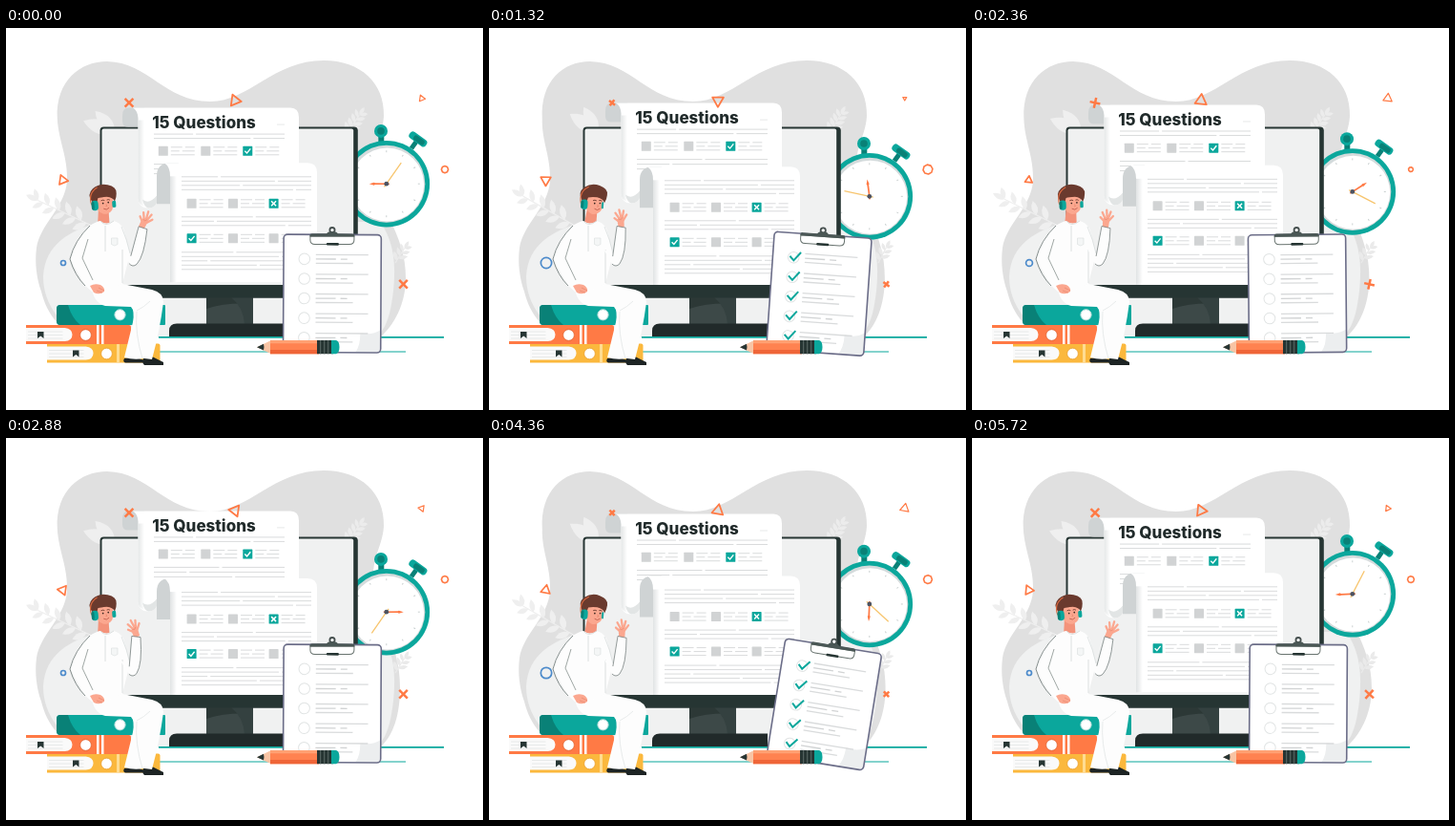
Animation, 500 px wide and 400 px high, one loop 5760 ms. Source, as an HTML page with a canvas:

```html
<!DOCTYPE html>
<html lang="en">
<head>
<meta charset="utf-8">
<title>Quiz illustration</title>
<style>
html, body { margin: 0; width: 100%; height: 100%; overflow: hidden; background: #fff; }
canvas { display: block; width: 500px; height: 400px; }
</style>
</head>
<body>
<canvas id="stage"></canvas>
<script>
const LOOP = 5760, STEP = 40, TAU = Math.PI * 2;
const TEAL = '#0ba79c', TEAL_DARK = '#098177', DARK = '#263533', ORANGE = '#ff7a45',
  YELLOW = '#fbb83d', SKIN = '#fba78f', HAIR = '#6a3a2e', LINE = '#d9dbdc', BOX = '#d1d3d4', SCREEN = '#f0f1f1';

const canvas = document.getElementById('stage');
const dpr = window.devicePixelRatio || 1;
canvas.width = 500 * dpr;
canvas.height = 400 * dpr;
const g = canvas.getContext('2d');

function fill(path, color) { g.fillStyle = color; g.fill(path); }
function stroke(path, color, width) {
  g.strokeStyle = color;
  g.lineWidth = width;
  g.stroke(path);
}
function shape(d, color, outline, width = 0.8) {
  const p = new Path2D(d);
  if (color) fill(p, color);
  if (outline) stroke(p, outline, width);
}
function rect(x, y, w, h, color, r = 0) {
  const p = new Path2D();
  p.roundRect(x, y, w, h, r);
  fill(p, color);
}
function disc(x, y, r, color, outline, width = 1) {
  const p = new Path2D();
  p.arc(x, y, Math.max(r, 0.1), 0, TAU);
  if (color) fill(p, color);
  if (outline) stroke(p, outline, width);
}
function seg(x1, y1, x2, y2, color, width) { shape(`M${x1} ${y1}L${x2} ${y2}`, null, color, width); }
function at(x, y, angle, draw, scale = 1) {
  g.save();
  g.translate(x, y);
  g.rotate(angle);
  g.scale(scale, scale);
  draw();
  g.restore();
}
function track(keys, x) {
  let i = 1;
  while (i < keys.length - 1 && x > keys[i][0]) i++;
  const [a, va] = keys[i - 1], [b, vb] = keys[i];
  const k = Math.min(1, Math.max(0, (x - a) / (b - a)));
  return va + (vb - va) * (1 - Math.cos(k * Math.PI)) / 2;
}

function leaf(x, y, angle, len, color) {
  at(x, y, angle, () => {
    const w = len * 0.42;
    shape(`M0 0Q${len * 0.45} ${-w} ${len} 0Q${len * 0.45} ${w} 0 0Z`, color);
  });
}
function sprig(x, y, angle, pairs, gap, len, color) {
  at(x, y, angle, () => {
    seg(0, 0, pairs * gap, 0, color, 1.2);
    for (let i = 1; i <= pairs; i++) {
      const size = len * (1 - 0.25 * i / pairs);
      leaf(i * gap - gap / 2, 0, -0.85, size, color);
      leaf(i * gap, 0, 0.85, size, color);
    }
    leaf(pairs * gap, 0, 0, len * 0.8, color);
  });
}

function background(c2, c3) {
  const e = 416 + 3 * c3, l = 54.8 - c2;
  shape(`M${l} 95C${l - 2} 55 78 35 106 35C150 36 166 77 214 77C255 77 280 34 333 34
    C372 34 397 58 396 92C395 112 385 122 385 145C386 185 ${e + 1} 215 ${e} 262
    C${e} 290 406 312 392 324L85 324C57 319 43 300 37 276C32 262 30 246 32 230
    C36 205 62 188 64 160C65 135 55 118 ${l} 95Z`, '#e0e0e0');
  shape(`M82 324C58 312 39 290 39 260C41 226 66 213 98 203L392 203
    C406 222 409 246 406 275C403 302 398 315 388 324Z`, SCREEN);
  const sway = 0.04 * c2, pale = '#efefef';
  sprig(90, 207, 3.62 - sway, 5, 12.5, 17, pale);
  leaf(114, 109, -2.68 - 3 * sway, 35, pale);
  leaf(114, 109, -2.2 - 3 * sway, 30, pale);
  sprig(357, 111, -1.02 + sway, 4, 6, 12, '#ececec');
  sprig(408, 246, -1.05 + sway, 3, 6, 11, '#eaeaea');
}

function stopwatch(u, c3) {
  g.save();
  g.translate(398.8, 172.7 - 9.5 * c3);
  rect(-8.5, -50, 6, 9, TEAL_DARK);
  disc(-5.8, -55.3, 7, TEAL);
  disc(-5.8, -55.3, 3.8, TEAL_DARK);
  at(32.5, -46, 0.62, () => {
    rect(-2.5, 2, 5, 9, TEAL_DARK);
    rect(-10.5, -5, 21, 8, TEAL, 3.5);
    rect(-5, -3.5, 13, 5.5, TEAL_DARK, 2.5);
  });
  disc(0, 0, 45.3, TEAL);
  disc(0, 0, 40.5, '#d5dbdc');
  disc(0.8, 0.8, 38.5, '#fff');
  for (let i = 0; i < 12; i++) at(0, 0, i * TAU / 12, () => seg(0, -35, 0, -33, '#c9cfcf', 1));
  at(0, 0, TAU * (3 * u) + 0.61, () => seg(0, 4, 0, -27, '#f7c56e', 1.3));
  at(0, 0, TAU * (u + 0.75), () => shape('M-0.8 3L0.8 3L0.9 -12L1.5 -13L0 -18L-1.5 -13L-0.9 -12Z', ORANGE));
  disc(0, 0, 2.4, '#4c5361');
  g.restore();
}

function monitor() {
  rect(98.5, 103.5, 270.3, 179, DARK, 4);
  rect(100.5, 105.5, 263.7, 163.5, SCREEN, 2);
  rect(210, 282, 49, 29, '#3d4948');
  shape('M210 282H259V289Q232 287 210 294Z', '#2c3836');
  shape('M236 282H259V310H250Q249 293 236 282Z', '#344140');
  shape('M171 324V317Q171 309.5 179 309.5H292V324Z', '#212a2a');
  rect(160, 323, 299, 1.8, TEAL);
  rect(160, 338.6, 259, 1, TEAL);
}

function tick(x, y, s, color, width) {
  shape(`M${x - s} ${y}L${x - s * 0.25} ${y + s * 0.75}L${x + s} ${y - s * 0.8}`, null, color, width);
}
function answer(x, y, mark) {
  rect(x - 5, y - 5, 10, 10, mark ? TEAL : BOX, 0.6);
  if (mark === 'tick') tick(x, y, 3, '#fff', 1.4);
  if (mark === 'cross') {
    seg(x - 2.5, y - 2.5, x + 2.5, y + 2.5, '#fff', 1.5);
    seg(x - 2.5, y + 2.5, x + 2.5, y - 2.5, '#fff', 1.5);
  }
  [[8, 20], [23, 33]].forEach(([a, b]) => seg(x + a, y - 4, x + b, y - 4, LINE, 1));
  [[8, 17], [20, 33]].forEach(([a, b]) => seg(x + a, y, x + b, y, LINE, 1));
  seg(x + 8, y + 4, x + 33, y + 4, LINE, 1);
}
function textRow(x, y, w, cut) {
  seg(x, y, x + w * cut, y, LINE, 1);
  seg(x + w * cut + 3, y, x + w, y, LINE, 1);
}

function firstSheet(c3) {
  g.save();
  g.translate(0, 81 + 3.6 * c3);
  shape('M145 -1H129Q122 -1 122 7V13Q122 19 128 19H145Z', '#cfd3d4');
  shape(`M133 -1H298Q307 -1 307 9V80H159V95Q158 104 149 104Q139 104 138.5 94
    V10Q138 2 133 -1Z`, '#fff');
  const shade = g.createLinearGradient(138, 0, 145, 0);
  shade.addColorStop(0, '#e2e5e5');
  shade.addColorStop(1, '#fff');
  shape('M138.5 12H145V102Q139 101 138.5 94Z', shade);
  shape('M143 95Q150 101 159 90V95Q158 104 149 104Q145 103 143 95Z', '#e2e5e5');
  g.fillStyle = '#202a2a';
  g.font = '800 17px Inter, "Open Sans", sans-serif';
  g.textBaseline = 'alphabetic';
  g.fillText('15 Questions', 153.3, 20.8);
  seg(284, 16.5, 292, 16.5, '#e7e9e9', 1);
  textRow(155, 26.5, 137, 0.3);
  textRow(155, 31, 137, 0.74);
  answer(164.8, 44.2);
  answer(209.3, 44.2);
  answer(253.3, 44.2, 'tick');
  textRow(155, 58, 137, 0.5);
  textRow(155, 63, 137, 0.25);
  textRow(155, 68, 137, 0.6);
  g.restore();
}

function secondSheet(c3) {
  g.save();
  g.translate(0, 144.2 - 2.9 * c3);
  shape('M181 0H170Q158 1 158 14V43H176V8Z', '#cfd3d4');
  shape('M166 0H316Q326 0 326 10V125H172V14Q172 4 166 0Z', '#fff');
  const shade = g.createLinearGradient(171, 0, 179, 0);
  shade.addColorStop(0, '#dcdfe0');
  shade.addColorStop(1, '#fff');
  shape('M172 14H179V125H172Z', shade);
  [[15, 0.28], [19.5, 0.72], [24, 0.45], [28.5, 0.86], [57, 0.55], [61.5, 0.25], [66, 0.8],
    [94, 0.4], [98.5, 0.75], [103, 0.2], [107.5, 0.58], [112, 0.82]]
    .forEach(([y, cut]) => textRow(184, y - 0.5, 136, cut));
  answer(194.6, 42.5);
  answer(238, 42.5);
  answer(280.6, 42.5, 'cross');
  answer(194.6, 79, 'tick');
  answer(238, 79);
  answer(280.6, 79);
  g.restore();
}

const SWING = [[0, 0.3], [0.05, 0], [0.4, 0], [0.458, 4], [0.52, 9.3], [0.56, 9.3],
  [0.66, 1.5], [0.745, -3.4], [0.822, -0.5], [0.9, 0.9], [1, 0.3]];

function clipboard(u) {
  const p = u * 2 % 1;
  g.save();
  g.translate(341.3, 340);
  g.rotate(track(SWING, p) * Math.PI / 180);
  g.translate(-341, -340);
  const board = new Path2D();
  board.roundRect(290.2, 216.4, 102.2, 123.4, 4);
  fill(board, '#fff');
  shape('M366 339Q371 333 371 319Q383 322 392 316V335Q392 339 388 339Z', '#eceeef');
  stroke(board, '#6b6d88', 1.6);
  disc(341, 211.6, 2.6, '#fff', '#46504f', 1.8);
  shape('M318 218V222Q318 226.5 323 226.5H359Q364 226.5 364 222V218Z', '#fff', '#68736f', 1);
  shape('M317.5 218.5V217Q317.5 215.3 320 215.3H335L337 213.5H345L347 215.3H362Q364.5 215.3 364.5 217V218.5Z', '#4a5755');
  rect(335, 225, 13, 2.6, DARK, 1);
  const fade = 1 - Math.min(1, Math.max(0, (p - 0.59) / 0.07));
  for (let i = 0; i < 5; i++) {
    const y = 242 + i * 20.6;
    disc(312, y, 5.8, '#fff', '#e1e4e4', 1);
    seg(324, y - 4.6, 379, y - 4.6, LINE, 1.3);
    seg(324, y, 345, y, BOX, 1.3);
    seg(350, y, 357, y, BOX, 1.3);
    seg(324, y + 4.4, 363, y + 4.4, LINE, 1.3);
    const k = Math.min(1, Math.max(0, (p - 0.03 - i * 0.07) / 0.06));
    if (k > 0 && fade > 0) {
      g.save();
      g.globalAlpha = fade;
      g.setLineDash([18 * k, 40]);
      tick(313.8, y - 1.2, 5.7, TEAL, 2);
      g.restore();
    }
  }
  g.restore();
}

function pencil() {
  shape('M263 334.3L278 327V341.2Z', '#f8c5a5');
  shape('M263 334.3L270 330.8Q271 334 270 337.6Z', DARK);
  rect(277, 327, 51, 14.2, '#ff8250');
  rect(277, 327, 51, 3.2, '#ffa173');
  rect(277, 337, 51, 4.2, '#ef6538');
  rect(326, 327, 17, 14.2, DARK);
  for (let x = 329; x < 341; x += 4) rect(x, 327, 1.2, 14.2, '#52615e');
  shape('M341 327H346Q349.5 328 349.5 334Q349.5 340 346 341.2H341Z', TEAL);
}

function binder(x, y, right, pageEnd, color, deep, mark) {
  rect(x, y, right - x, 20, color, [0, 2, 2, 0]);
  shape(`M${x} ${y + 3}H${pageEnd - 8}Q${pageEnd} ${y + 4} ${pageEnd} ${y + 10}
    Q${pageEnd} ${y + 16.5} ${pageEnd - 8} ${y + 17}H${x}Z`, '#fafafa');
  [7, 10.5, 14].forEach(dy => seg(x + 2, y + dy, pageEnd - 10, y + dy, '#e3e5e5', 0.8));
  shape(`M${mark} ${y + 7}h6.5v7l-3.2 -2.6l-3.3 2.6Z`, DARK);
  disc(pageEnd + 14, y + 10.5, 5.8, '#fff', deep, 0.7);
}
function books() {
  binder(43, 330.5, 161.5, 91.5, YELLOW, '#e79a28', 70);
  rect(116, 331, 3, 19, '#ffdc91');
  binder(21, 311, 131, 69.5, ORANGE, '#dc5d2c', 33);
  rect(95, 311, 2.5, 20, '#fff');
  rect(100, 311, 2.5, 20, '#fff');
  rect(53, 290, 114, 21, TEAL, [4, 1, 1, 4]);
  shape('M57 290H65Q69 304 78 311H57Q53 311 53 307V294Q53 290 57 290Z', TEAL_DARK);
  disc(119.5, 300.3, 5.6, '#fff', '#b8dedb');
}

function head(c2) {
  at(105.8 - 3.5 * c2, 183.5, -0.07 * c2, () => {
    const look = -1.2 * c2;
    shape('M-6 5H5V22Q0 26 -8 21Z', '#f3937b');
    shape('M-9 -8Q0 -13 10 -7Q12 2 9 8Q5 13 -1 12Q-8 9 -10 0Z', SKIN);
    shape(`M-13 -3Q-18 -11 -11 -17Q-3 -23 6 -20Q16 -17 15 -10Q15 -6 12.5 -1
      Q11 -6 4 -7Q-3 -7 -6 -6Q-7 -1 -9 2Z`, HAIR);
    shape('M-13.5 1Q-17 -12 -6 -18', null, '#d9683f', 1.2);
    rect(9.5, -2, 3.2 + c2, 7.5, TEAL, 1.6);
    rect(-13.5, -3.5, 7.5, 11, TEAL, 3.6);
    rect(-13.5, -2.5, 3, 9, TEAL_DARK, 1.5);
    disc(0.5 + look, 0, 0.9, '#392620');
    disc(6.5 + look, -0.5, 0.9, '#392620');
    shape(`M${-1.5 + look} -3Q${0.5 + look} -4.2 ${2.5 + look} -3M${5 + look} -3.4Q${7 + look} -4.4 ${8.5 + look} -3`, null, HAIR, 0.9);
    shape(`M${3.8 + look} 1L${4.8 + look} 3.4L${3.2 + look} 3.6`, null, '#e58168', 0.7);
    shape(`M${0.7 + look} 6Q${4 + look} 8.6 ${7 + look} 5.4`, null, '#bf5c4c', 0.9);
  }, 0.94);
}

function forearm(c3) {
  at(133, 248, 0.09 * c3, () => {
    at(7, -43.5, 0.3 * c3, () => {
      g.lineCap = 'round';
      shape('M-1 4L-1 -4M-1 -5L-5 -13M1 -6L0 -16M2 -5L5 -14M3 -3L8 -9M-3 -3L-7 -7', null, SKIN, 2.6);
      shape('M-4 5L-4 -5Q0 -9 4 -4L3 5Z', SKIN);
      shape('M-2 -5Q1 -3 2 -6', null, '#e58168', 0.6);
      g.lineCap = 'butt';
    }, 0.88);
    shape('M-13 -18L-3 -9L2.5 -40.5L11.5 -38.5Q11 -10 4 -1Q0 3 -4 -1Z', '#fdfdfd');
    shape('M-3 -9L2.5 -40.5L11.5 -38.5Q11 -10 4 -1Q0 3 -4 -1', null, '#687371', 0.7);
  });
}

function man(c2, c3) {
  shape('M124 346L134 344L145 348V350.5H125Q122 349 124 346Z', '#1d2424');
  shape('M144 346L154 344.5L165 350V353H145Q142 350 144 346Z', '#1d2424');
  shape(`M89 268Q91 288 104 291L131 292Q135 296 133 308L124 345Q134 348 145 346
    L153 347Q161 318 165 287Q165 277 153 274L122 268Z`, '#fdfdfd');
  shape('M137 296Q145 292 151 286M137 297Q135 320 143 346', null, '#e3e6e6', 0.8);
  head(c2);
  shape(`M88 207Q96 202 99 202Q105 207 113 202Q120 204 123 210L130 236L122 268
    Q108 276 90 276L82 269L67 242Q72 220 88 207Z`, '#fdfdfd');
  shape('M88 207Q72 222 67 242Q72 259 83 270', null, '#687371', 0.8);
  shape('M86 221L80 241L91 264', null, '#78827f', 0.7);
  shape('M121 208Q127 222 130 236', null, '#d5dada', 0.7);
  shape('M99 202Q104 209 113 202M104 207V234M122 232L122 267', null, '#d3d8d8', 0.8);
  shape('M110.5 220H117V226.5L113.8 228L110.5 226.5Z', '#f4f6f6', '#dde1e1', 0.7);
  shape('M88 270Q93 267 99 269Q104 272 103 276Q98 280 92 277Z', SKIN);
  shape('M95 275L101 277M97 272L103 275', null, '#e58168', 0.6);
  forearm(c3);
}

function plus(x, y, angle, len) {
  at(x, y, angle, () => {
    seg(-len / 2, 0, len / 2, 0, ORANGE, 2.5);
    seg(0, -len / 2, 0, len / 2, ORANGE, 2.5);
  });
}
function polygon(x, y, angle, r, sides, width) {
  const p = new Path2D();
  for (let i = 0; i < sides; i++) {
    const a = angle + i * TAU / sides;
    p.lineTo(x + r * Math.cos(a), y + r * Math.sin(a));
  }
  p.closePath();
  g.lineJoin = 'round';
  stroke(p, ORANGE, width);
  g.lineJoin = 'miter';
}
function confetti(u, c2, s2, s3) {
  const spin = u * TAU, tri = spin + 0.14;
  plus(129, 78.3, spin + TAU / 8, 10 + 2.4 * c2);
  plus(416.5, 268.3, spin + TAU / 8, 10 + 2.2 * c2);
  polygon(240, 76, tri, 6.8 - 0.3 * s2, 3, 1.8);
  polygon(59.5, 159.3, tri, 5.8 + 1.4 * s2, 3, 1.7);
  polygon(435.8, 73.7, tri, 3.8 + 1.6 * s3, 3, 1.2);
  polygon(460, 148.1, spin, 4.1 + 1.6 * s2 - 0.5 * c2, 8, 1.6);
  disc(60, 246, 4.1 - 1.6 * c2, null, '#4d8bcb', 1.7);
}

function draw(t) {
  const u = t / LOOP;
  const c2 = Math.cos(TAU * 2 * u), s2 = Math.sin(TAU * 2 * u);
  const c3 = Math.cos(TAU * 3 * u), s3 = Math.sin(TAU * 3 * u);
  g.setTransform(dpr, 0, 0, dpr, 0, 0);
  g.fillStyle = '#fff';
  g.fillRect(0, 0, 500, 400);
  background(c2, c3);
  stopwatch(u, c3);
  monitor();
  firstSheet(c3);
  secondSheet(c3);
  rect(120, 269, 248.8, 13.5, DARK, [0, 0, 4, 0]);
  clipboard(u);
  pencil();
  books();
  man(c2, c3);
  confetti(u, c2, s2, s3);
}

const start = performance.now();
function frame() {
  const t = (performance.now() - start) % LOOP;
  draw(Math.floor(t / STEP) * STEP);
  requestAnimationFrame(frame);
}
frame();
</script>
</body>
</html>
```
